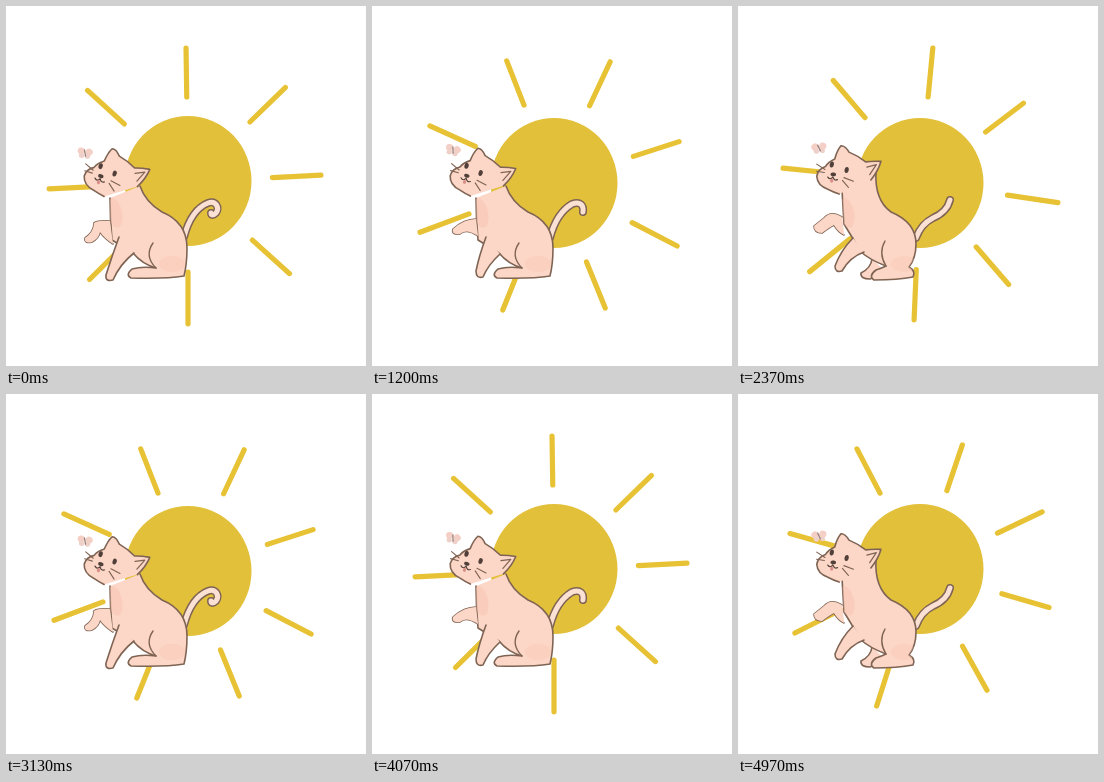
An HTML page with a canvas that plays this animation: 360x360 px, repeating every 5 s.

```html
<!DOCTYPE html>
<html>
<head>
<meta charset="utf-8">
<title>Cat and sun</title>
<style>
html, body { margin: 0; width: 100%; height: 100%; overflow: hidden; background: #fff; }
canvas { display: block; width: 360px; height: 360px; }
</style>
</head>
<body>
<canvas id="stage" width="360" height="360"></canvas>
<script>
const ctx = document.getElementById('stage').getContext('2d');
const PINK = '#fcd6c6', SHADE = '#f7c6b4', LINE = '#7f6454', DARK = '#51403a';
const CENTER = { x: 182, y: 176 };

// Outer ray tips of each hand-drawn sun, clockwise, as x,y pairs.
const RAYS = [
  '180,40 281,80 317,169 285,269 182,320 82,275 41,183 80,83',
  '195,40 287,96 322,197 272,280 176,316 70,267 43,162 94,73',
  '213,47 300,107 315,203 259,292 149,318 61,250 46,152 107,60',
  '225,49 306,117 313,214 250,298 138,314 55,240 50,139 118,53',
  '239,54 309,135 307,241 234,304 130,306 46,227 56,119 134,53',
  '252,61 316,147 302,249 221,311 113,301 43,211 62,108 147,47',
  '263,71 320,160 294,254 207,314 97,292 42,196 70,99 160,43'
].map(row => row.split(' ').map(p => p.split(',').map(Number)));
const SUN_DROP = [0, 2, 2, 0, 2, 1, 0];

const SIT = {
  torso: 'M134 180C138 192 146 200 156 206C173 213 181 226 181 242Q181 258 178 270Q160 273 125 272Q119 269 126 263Q136 260 150 262Q136 258 127 247L106 234Q104 212 104 192',
  haunch: 'M147 237Q138 250 150 262',
  foot: ''
};
const RISE = {
  torso: 'M138 166C137 184 142 198 153 206C170 213 178 224 178 238Q178 252 171 261Q178 265 175 271Q160 274 136 274Q130 270 138 264Q144 262 148 260Q132 254 123 246L106 218Q105 200 104 184',
  haunch: 'M147 235Q140 247 148 260',
  foot: 'M134 253Q133 262 123 267Q122 273 132 273L148 266'
};

const POSES = [
  { ...SIT, head: [108, 171.5, 0.29], moth: [79, 147, 0.15],
    far: 'M104 215Q92 214 88 217Q88 226 79 232Q78 238 86 236Q93 232 94 226Q98 232 107 238',
    near: 'M113 231Q106 250 100 269Q99 276 107 274Q114 258 128 247',
    tail: 'M178 231C183 212 192 201 202 197C210 194 214 202 210 207C207 210 205 209 205 207' },
  { ...SIT, head: [108, 171, 0.28], moth: [81, 144, 0.3],
    far: 'M104 213Q92 213 81 223Q79 229 88 228Q94 222 106 230',
    near: 'M114 231Q107 250 104 265Q104 273 111 271Q116 259 128 248',
    tail: 'M178 232C182 216 190 204 200 198C208 195 212 199 211 206' },
  { ...RISE, head: [108.5, 168, 0.16], moth: [81, 142, -0.1],
    far: 'M104 211Q93 204 86 212L76 220Q76 227 84 227Q92 221 96 219Q100 226 106 229',
    near: 'M115 232Q103 244 97 260Q97 267 104 265Q112 251 126 246',
    tail: 'M178 232Q183 218 195 212Q209 206 212 194' },
  { ...RISE, head: [113, 165, 0], moth: [75, 141, -0.35],
    far: 'M106 211Q96 198 78 206Q75 212 82 212Q92 209 97 215L106 222',
    near: 'M121 230Q104 236 93 249Q91 256 100 254Q108 246 126 246',
    tail: 'M177 231C187 219 201 214 201 202Q201 192 191 196' }
];

// Pose held until each time (ms) within one cat cycle.
const CAT_CYCLE = 1040;
const CAT_STEPS = [[173, 0], [290, 1], [410, 2], [816, 3], [945, 2], [CAT_CYCLE, 1]];

function stroke(d, color, width) {
  ctx.strokeStyle = color;
  ctx.lineWidth = width;
  ctx.stroke(new Path2D(d));
}

function shape(d, fill = PINK) {
  ctx.fillStyle = fill;
  ctx.fill(new Path2D(d));
  stroke(d, LINE, 1.6);
}

function oval(x, y, rx, ry, color, turn = 0) {
  ctx.fillStyle = color;
  ctx.beginPath();
  ctx.ellipse(x, y, rx, ry, turn, 0, Math.PI * 2);
  ctx.fill();
}

function placed([x, y, turn], draw) {
  ctx.save();
  ctx.translate(x, y);
  ctx.rotate(turn);
  draw();
  ctx.restore();
}

function drawSun(i) {
  const { x, y } = CENTER;
  oval(x, 175 + SUN_DROP[i], 63.5, 65, '#e3c03a');
  for (const [tx, ty] of RAYS[i]) {
    const at = k => `${x + (tx - x) * k} ${y + (ty - y) * k}`;
    stroke(`M${at(0.625)}L${at(0.985)}`, '#e8c235', 5.2);
  }
}

function drawHead() {
  shape('M25 2Q31 -8 32 -18Q23 -17 17 -15Q8 -20 -1 -22Q-6 -28 -10 -27Q-13 -22 -14 -13Q-20 -9 -22 -4Q-29 0 -29 7Q-27 16 -16 18Q-10 20 -4 21');
  stroke('M19 -10L28 -14L23 -3', LINE, 1.2);
  oval(-16, -7, 2.1, 3, DARK);
  oval(-0.5, -4, 2.1, 3, DARK);
  oval(-13, 2.5, 2.8, 1.9, DARK);
  stroke('M-18 6Q-15 9 -13 5Q-11 9 -8 7', DARK, 1.2);
  oval(-13.5, 9, 1.6, 2, '#d98f88');
  stroke('M-22 -1L-31 -5M-22 2L-30 2M-2 4L8 6M-3 7L4 13', LINE, 1.1);
}

function drawMoth() {
  for (const side of [-1, 1]) {
    oval(side * 4, -1.5, 3.6, 3.4, '#f4cfc5', side * 0.4);
    oval(side * 3, 3, 2.7, 2.4, '#eed0c8');
  }
  stroke('M-1 -3L1 3', '#9b827a', 1.3);
}

function drawCat(pose) {
  stroke(pose.tail, LINE, 8);
  stroke(pose.tail, '#fbe0d4', 5);
  if (pose.foot) shape(pose.foot);
  shape(pose.far);
  shape(pose.torso);
  ctx.save();
  ctx.clip(new Path2D(pose.torso));
  oval(109, 207, 7, 15, SHADE + '88', -0.2);
  oval(166, 258, 13, 8, SHADE + '66');
  ctx.restore();
  stroke(pose.haunch, LINE, 1.4);
  // Cover the chest line where the far leg joins.
  ctx.fillStyle = PINK;
  ctx.fill(new Path2D(pose.far));
  shape(pose.near);
  placed(pose.head, drawHead);
  placed(pose.moth, drawMoth);
}

function render(now) {
  // Sampled at the middle of each 1/30 s step.
  const t = (Math.floor((now % 5000 + 5) * 0.03) % 150 + 0.5) / 0.03;
  ctx.fillStyle = '#fff';
  ctx.fillRect(0, 0, 360, 360);
  ctx.lineCap = ctx.lineJoin = 'round';
  drawSun(Math.floor(t * 7 / 2000) % 7);
  const step = CAT_STEPS.find(([end]) => t % CAT_CYCLE < end);
  drawCat(POSES[step[1]]);
}

const start = performance.now();
function loop() {
  render(performance.now() - start);
  requestAnimationFrame(loop);
}
loop();
</script>
</body>
</html>
```
